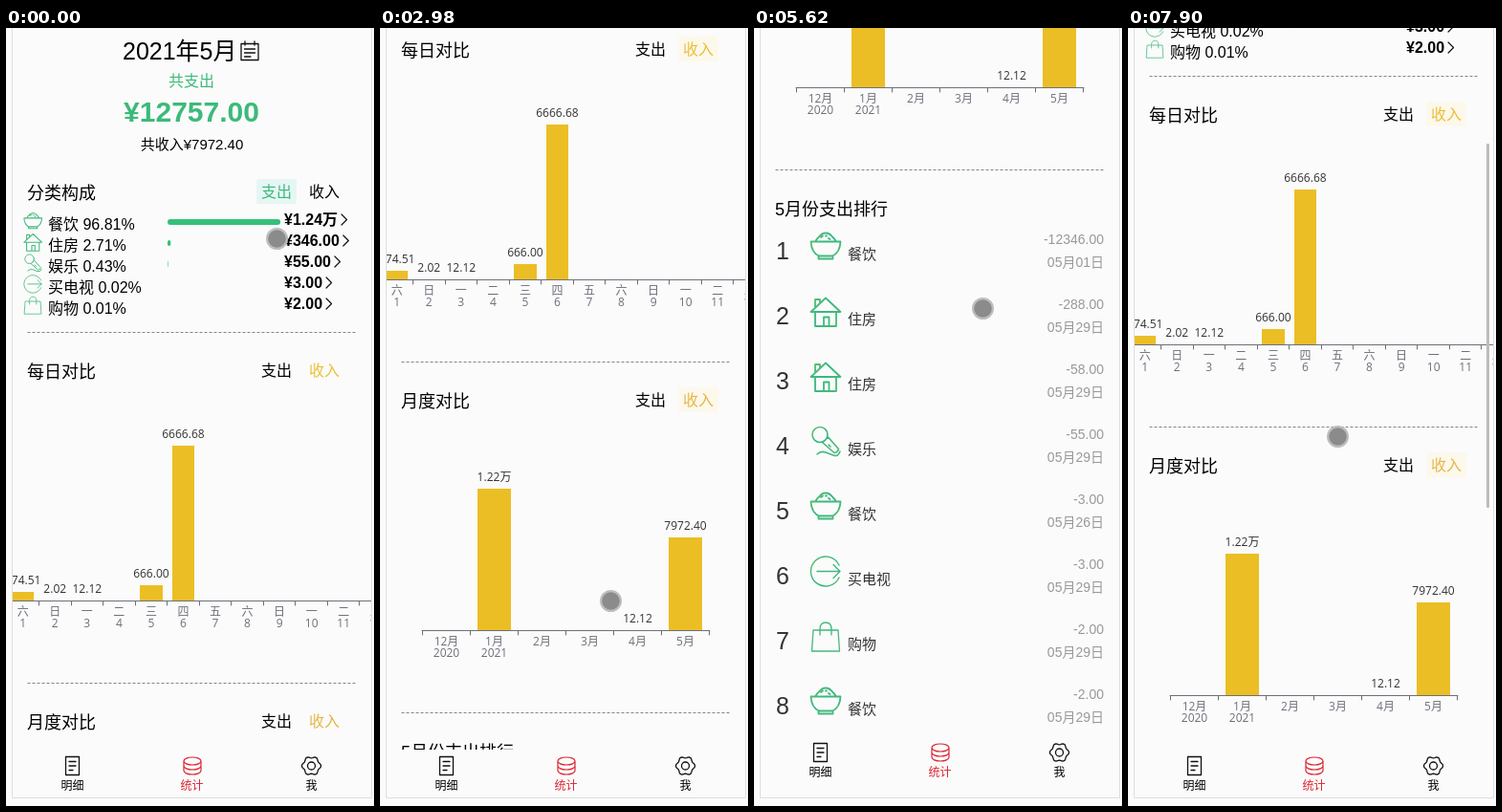
These frames come from a looping animation (385x814 px, 8000 ms). An HTML page:

```html
<!DOCTYPE html>
<html lang="zh-CN">
<head>
<meta charset="utf-8">
<title>统计</title>
<style>
html, body { margin: 0; width: 100%; height: 100%; overflow: hidden; background: #fbfbfb; }
svg { display: block; width: 385px; height: 814px; }
text { font-family: "Liberation Sans", "Noto Sans CJK SC", "Noto Sans CJK", sans-serif; white-space: pre; }
.chart text { font-family: "Open Sans", "Noto Sans CJK SC", "Noto Sans CJK", sans-serif; }
.line { fill: none; stroke-linecap: round; stroke-linejoin: round; }
</style>
</head>
<body>
<svg id="stage" viewBox="0 0 385 814"></svg>
<script>
const GREEN = '#3cba7a', YELLOW = '#ebbe25', AXIS = '#6e7079', PAGE = '#fbfbfb', RED = '#dc2430';

// y is the visual middle of the line
const text = (s, x, y, size, fill = '#000', anchor = 'start', weight = 400) =>
  `<text x="${x}" y="${(y + size * .37).toFixed(1)}" font-size="${size}" fill="${fill}" text-anchor="${anchor}" font-weight="${weight}">${s}</text>`;
const rect = (x, y, w, h, fill, r = 0) =>
  `<rect x="${x}" y="${y}" width="${w}" height="${h}" fill="${fill}" rx="${r}"/>`;
const line = (d, stroke, width = 1) =>
  `<path class="line" d="${d}" stroke="${stroke}" stroke-width="${width}"/>`;
const dashes = y =>
  `<path d="M22.5 ${y + .5}H366" stroke="#858585" stroke-dasharray="3 2"/>`;
const advance = s =>
  [...s].reduce((w, c) => w + (c == '.' ? .28 : c == '万' ? 1 : .556), 0);

const icons = {
  餐饮: ['M1.5 11.5H32.5Q32 23 24 26.5H10Q2 23 1.5 11.5ZM9.5 26.5V29.5H24.5V26.5M6 11.5Q8 8 10 6.5Q13 2.5 17 2.5T24 6.5Q26 8 28 11.5M12 7l2-1.5M17 5.5h1M20 8l1.5 1', 1.8],
  住房: ['M1.5 17L17 2.5L32.5 17ZM6 17V32H28V17M6 13V4H11V8M15 32V22.5H20.5V32', 1.8],
  娱乐: ['M19 9.5A8 8 0 1 1 3 9.5A8 8 0 1 1 19 9.5M16.5 15L19.5 12L30.5 24.5Q29.5 28 26 28.5L14 18M20 20l2 2M8 30Q12 26 17 28T25 31Q30 33 32 27', 1.6],
  买电视: ['M31 10A15.5 15.5 0 1 0 31 23M8 16.5H32M25 9.5L32 16.5L25 23.5', 1.4],
  购物: ['M4 10H30L31.5 32H2.5ZM11 15V9Q11 2 17 2T23 9V15', 1.3]
};
const icon = (name, x, y, scale) => {
  const [d, width] = icons[name];
  return `<g transform="translate(${x} ${y}) scale(${scale})">${line(d, 'url(#leaf)', width)}</g>`;
};

const tabs = (y, active, color, tint, cls) =>
  `<g class="${cls}">${rect(active ? 312 : 262, y - 13, 42, 26, tint, 2)}</g>` +
  text('支出', 267, y, 16, active ? '#000' : color) +
  text('收入', 317, y, 16, active ? color : '#000');

function summary() {
  const rows = [['餐饮', 96.81, '1.24万'], ['住房', 2.71, '346.00'], ['娱乐', .43, '55.00'],
    ['买电视', .02, '3.00'], ['购物', .01, '2.00']];
  return text('2021年5月', 122, 24, 25) +
    line('M246 16.5H264V33.5H246ZM250 14V18M260 14V18M249.5 22H260.5M249.5 26H260.5M249.5 30H256', '#111', 1.3) +
    text('共支出', 194, 55, 16, GREEN, 'middle') +
    text('¥12757.00', 194, 87, 30, GREEN, 'middle', 700) +
    text('共收入¥7972.40', 194.5, 121, 15, '#000', 'middle') +
    text('分类构成', 22, 172, 18) + tabs(171, 0, GREEN, '#e6f6f5', '') +
    rows.map(([name, share, sum], i) => {
      const y = 205 + i * 22, bar = share * 1.22, end = 291 + 16 * advance('¥' + sum);
      return icon(name, 18, y - 13, .6) +
        text(`${name} ${share.toFixed(2)}%`, 44, y, 16) +
        rect(169, y - 5, bar, 6, '#36c07b', Math.min(3, bar / 2)) +
        text('¥' + sum, 291, y - 5, 16, '#000', 'start', 700) +
        line(`M${end + 4} ${y - 10}l5.5 5.5l-5.5 5.5`, '#111', 1.2);
    }).join('');
}

const amount = v => v < 1e4 ? v.toFixed(2) : (v / 1e4).toFixed(2) + '万';

// columns are [labels under the axis, value]
function chart({ base, left, right, pitch, first, barWidth, scale, columns }) {
  let out = line(`M${left} ${base + .5}H${right}`, AXIS);
  for (let x = first - pitch / 2; x < right + 1; x += pitch)
    if (x >= left) out += line(`M${Math.floor(x) + .5} ${base + 1}v4`, AXIS);
  columns.forEach(([labels, value], i) => {
    const x = first + i * pitch;
    labels.forEach((s, k) => out += text(s, x, base + 12 + k * 12, 12, AXIS, 'middle'));
    if (!value) return;
    const height = Math.round(value * scale), x0 = Math.round(x - barWidth / 2);
    out += rect(x0, base - height, Math.round(x + barWidth / 2) - x0, height, YELLOW) +
      text(amount(value), x, base - 12 - height, 12, '#333', 'middle');
  });
  return `<g class="chart">${out}</g>`;
}

function charts() {
  const spent = [374.51, 2.02, 12.12, 0, 666, 6666.68];
  const days = Array.from({ length: 12 }, (_, i) => [['六日一二三四五'[i % 7], i + 1], spent[i]]);
  const months = [[['12月', 2020]], [['1月', 2021], 12170], [['2月']], [['3月']], [['4月'], 12.12], [['5月'], 7972.4]];
  const head = (title, y, color) => text(title, 22, y, 18) + tabs(y - 1, 1, color, '#fcf8ec', 'tint');
  return dashes(318) + head('每日对比', 359, '#ebbf35') +
    chart({ base: 599, left: 7, right: 382, pitch: 33.55, first: 17.7, barWidth: 23.4, scale: .0243, columns: days }) +
    dashes(685) + head('月度对比', 726, '#e6b644') +
    chart({ base: 966, left: 44, right: 345, pitch: 50, first: 69.5, barWidth: 35, scale: .01217, columns: months }) +
    dashes(1052);
}

function ranking() {
  const rows = [['餐饮', 12346, '01'], ['住房', 288, 29], ['住房', 58, 29], ['娱乐', 55, 29],
    ['餐饮', 3, 26], ['买电视', 3, 29], ['购物', 2, 29], ['餐饮', 2, 29]];
  return text('5月份支出排行', 22, 1093, 18) + rows.map(([name, sum, day], i) => {
    const y = 1137 + i * 68;
    return text(i + 1, 23, y, 25, '#333') + icon(name, 58, y - 21, 1) +
      text(name, 98, y + 3, 15, '#333') +
      text(`-${sum}.00`, 366, y - 12, 14, '#999', 'end') +
      text(`05月${day}日`, 366, y + 12, 14, '#999', 'end');
  }).join('');
}

function nav() {
  const ring = y => `M186 ${y}a9 4 0 0 0 18 0`;
  const gear = Array.from({ length: 48 }, (_, i) => {
    const a = i * Math.PI / 24, r = 9.1 + .9 * Math.cos(6 * a);
    return `${(319.5 + r * Math.cos(a)).toFixed(1)} ${(772 + r * Math.sin(a)).toFixed(1)}`;
  }).join('L');
  return rect(7, 755, 375, 64, PAGE) +
    line('M62.5 762.5H76.5V781.5H62.5ZM66 767.5H73M66 772H73M66 776.5H70', '#111', 1.3) +
    line(`M186 767a9 4 0 0 1 18 0${ring(767)}${ring(772)}${ring(777)}M186 767v10M204 767v10`, RED, 1.2) +
    line(`M${gear}ZM323.5 772a4 4 0 1 1-8 0a4 4 0 1 1 8 0`, '#111', 1.3) +
    ['明细', '统计', '我'].map((s, i) => text(s, 69.5 + i * 125, 792.5, 12, i == 1 ? RED : '#000', 'middle')).join('');
}

document.getElementById('stage').innerHTML = `
  <defs>
    <clipPath id="inside"><rect x="7" y="0" width="375" height="805"/></clipPath>
    <linearGradient id="leaf" gradientUnits="userSpaceOnUse" x1="0" y1="0" x2="34" y2="34">
      <stop offset="0" stop-color="#6cc06c"/><stop offset=".4" stop-color="#36b880"/><stop offset="1" stop-color="#50ba78"/>
    </linearGradient>
  </defs>
  <g clip-path="url(#inside)">
    <g id="page">${summary()}${charts()}${ranking()}</g>
    <g id="nav">${nav()}</g>
  </g>
  ${line('M6.5 0V805.5H382.5V0', '#dedede')}
  <rect id="thumb" x="375" width="3" height="381" rx="1" fill="#bcbcbc"/>
  <g id="touch"><circle r="11.5" fill="#bdbdbd"/><circle r="9.3" fill="#8b8b8b"/></g>`;

const LOOP = 8000, SLOP = 16, INNER_MAX = 890, GLIDE_MS = 400;

// pointer wandering before the first drag: [time, x, y]
const hover = [[150, 283, 220], [750, 319, 233], [950, 319, 233], [1290, 240, 524], [1680, 251, 588]];
// pow shapes the speed of the finger, glide is the travel after release
const drags = [
  { start: 1680, time: 670, from: [251, 588], to: [273, 298], pow: .716, glide: 62 },
  { start: 3130, time: 660, from: [241, 599], to: [240, 309], pow: .578, glide: 37 },
  { start: 4420, time: 660, from: [241, 609], to: [240, 300], pow: .937, glide: 14 },
  { start: 5470, time: 1560, from: [239, 281], to: [235, 772], pow: 1.575, glide: -6 },
  { start: 7630, time: 370, from: [219, 256], to: [219, 490], pow: 1, glide: 0 }
];

const clamp = p => Math.min(1, Math.max(0, p));
const smooth = p => p * p * (3 - 2 * p);
const mix = (a, b, p) => a.map((v, i) => v + (b[i] - v) * p);

// the picture advances at an uneven rate, on a 30 ms clock
function snap(t) {
  const tick = 30, every = 4.42, phase = 2200;
  const n = Math.ceil((Math.floor((t - phase) / tick) + 1) / every) - 1;
  return Math.max(0, phase + tick * Math.floor(every * n));
}

function hoverAt(t) {
  const i = hover.findIndex(h => h[0] > t);
  if (i < 1) return hover[0].slice(1);
  const [a, b] = [hover[i - 1], hover[i]];
  return mix(a, b, smooth((t - a[0]) / (b[0] - a[0]))).slice(1);
}

function pose(t) {
  let y = 0, finger = hoverAt(t), scrolling = false;
  drags.forEach((d, i) => {
    if (t < d.start) return;
    const end = d.start + d.time, next = drags[i + 1];
    finger = mix(d.from, d.to, clamp((t - d.start) / d.time) ** d.pow);
    const moved = finger[1] - d.from[1];
    const pull = Math.sign(moved) * Math.max(0, Math.abs(moved) - SLOP);
    scrolling = pull != 0 && t < end + 600;
    y = Math.min(Math.max(y, INNER_MAX), y - pull);
    y += d.glide * (1 - (1 - clamp((t - end) / GLIDE_MS)) ** 2);
    if (next && t > end)
      finger = mix(d.to, next.from, smooth(clamp((t - end) / (next.start - 150 - end))));
  });
  return { y: Math.round(y), finger: finger.map(Math.round), scrolling };
}

const [page, navBar, thumb, touch] = ['page', 'nav', 'thumb', 'touch'].map(id => document.getElementById(id));
const tints = document.querySelectorAll('.tint');

function draw() {
  const { y, finger, scrolling } = pose(snap(performance.now() % LOOP));
  page.setAttribute('transform', `translate(0 ${-y})`);
  navBar.setAttribute('transform', `translate(0 ${-Math.max(0, y - INNER_MAX)})`);
  thumb.setAttribute('y', Math.round(Math.min(y, INNER_MAX) * .4725 - 6));
  thumb.style.display = scrolling ? '' : 'none';
  touch.setAttribute('transform', `translate(${finger[0] + .5} ${finger[1] + .5})`);
  tints.forEach(el => el.style.display = y > 0 && y < 450 ? '' : 'none');
  requestAnimationFrame(draw);
}
draw();
</script>
</body>
</html>
```
